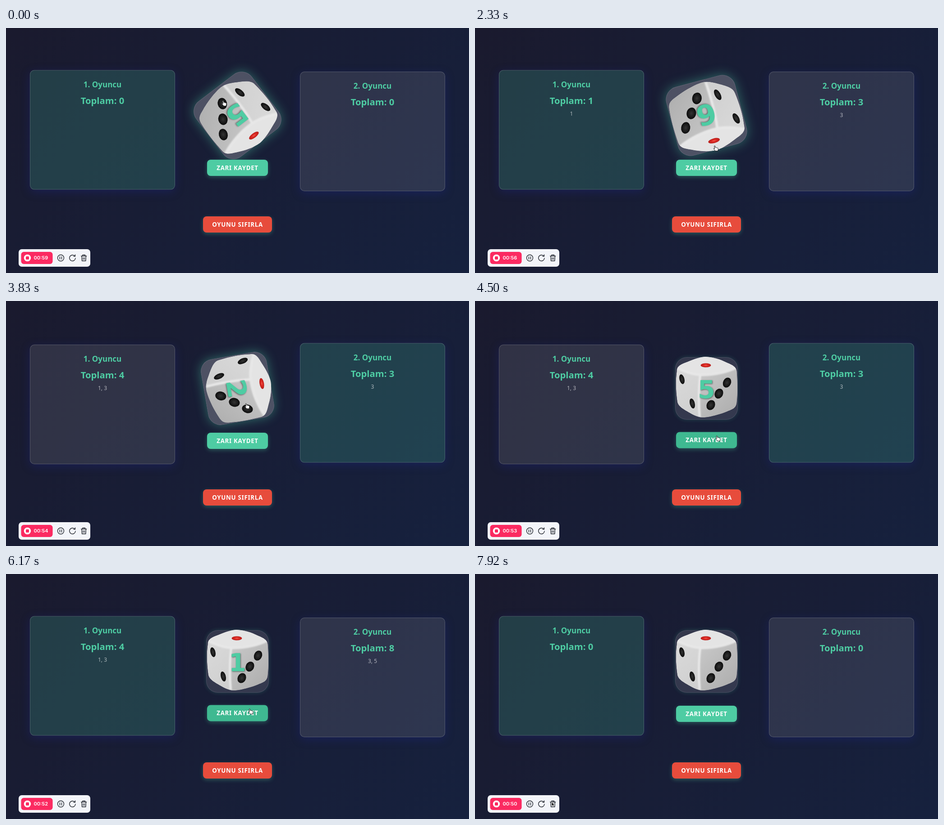
Write an HTML page that moves like this. It is 1027 by 545 pixels and loops after 8000 ms.

```html
<!DOCTYPE html>
<html lang="tr">
<head>
<meta charset="utf-8">
<title>Zar Oyunu</title>
<style>
  html, body { margin: 0; width: 100%; height: 100%; overflow: hidden; }
  body {
    position: relative;
    background: linear-gradient(135deg, #1a1a2e, #16213e);
    font-family: "Noto Sans", "Open Sans", sans-serif;
  }
  .card, .button, .die, .recorder, .cursor { position: absolute; box-sizing: border-box; }
  .card {
    top: 97px; width: 322px; height: 266px;
    border: 1px solid rgba(255, 255, 255, .18); border-radius: 10px;
    box-shadow: 0 5px 20px rgba(31, 38, 135, .37);
    color: #4ecca3; text-align: center; font-weight: 700;
  }
  .card div { position: absolute; width: 100%; line-height: 24px; }
  .name { top: 18.5px; font-size: 17px; }
  .total { top: 53.5px; font-size: 20.3px; }
  .card .list { top: 84px; font-size: 12px; font-weight: 400; color: rgba(255, 255, 255, .64); }
  .button {
    height: 36px; border-radius: 8px; line-height: 36px;
    box-shadow: 0 3px 10px rgba(78, 204, 163, .32);
    color: #fff; font-size: 13.3px; font-weight: 700; text-align: center;
    letter-spacing: .7px; white-space: nowrap;
  }
  .save { left: 446px; top: 292.5px; width: 135px; }
  .reset { left: 437px; top: 419px; width: 153px; }
  .die {
    left: 444px; top: 125px; width: 139px; height: 139px;
    border: 1px solid rgba(255, 255, 255, .1); border-radius: 26px;
  }
  .die svg { position: absolute; left: -1px; top: -1px; overflow: visible; }
  .number {
    position: absolute; inset: 0; text-align: center;
    font: 700 55px/143px "DejaVu Sans", sans-serif; color: #4ecca3;
    text-shadow: 1px 1px 3px rgba(0, 0, 0, .5);
  }
  .recorder {
    left: 28px; top: 492px; width: 159px; height: 39px;
    border-radius: 7px; background: #f3f5fa;
  }
  .recorder svg { position: absolute; left: 0; top: 0; }
  .clock {
    position: absolute; left: 33.5px; top: 6px; line-height: 27px;
    font-family: Inter, sans-serif; font-size: 11px; font-weight: 600; color: #fff;
  }
  .cursor { left: -8px; top: -8px; }
</style>
</head>
<body>
<div class="card" style="left:53px">
  <div class="name">1. Oyuncu</div><div class="total"></div><div class="list"></div>
</div>
<div class="card" style="left:652px">
  <div class="name">2. Oyuncu</div><div class="total"></div><div class="list"></div>
</div>

<div class="die">
  <svg width="139" height="139" viewBox="-69.5 -69.5 139 139">
    <defs>
      <linearGradient id="left" x1="0" y1="0" x2="1" y2="1">
        <stop stop-color="#dcdcdc"/><stop offset="1" stop-color="#c8c8c8"/>
      </linearGradient>
      <linearGradient id="right" x1="0" y1="0" x2=".7" y2="1">
        <stop stop-color="#cacaca"/><stop offset="1" stop-color="#afafaf"/>
      </linearGradient>
      <radialGradient id="pip">
        <stop stop-color="#353535"/><stop offset=".6" stop-color="#1c1c1c"/><stop offset="1" stop-color="#0c0c0c"/>
      </radialGradient>
      <radialGradient id="red">
        <stop stop-color="#f0564a"/><stop offset=".5" stop-color="#d9251f"/><stop offset="1" stop-color="#b5201c"/>
      </radialGradient>
      <filter id="soft"><feGaussianBlur stdDeviation="1.6"/></filter>
      <path id="body" d="M-66-38C-66-52-52-55-40-60C-28-65-14-70-2-70.5C14-70 30-65 46-57C58-52 66-48 67-38C69-10 69 10 67 30C66 44 58 46 46 51C32 57 10 63-2 64C-16 66-26 61-38 54C-50 47-64 40-65 28C-68 5-69-15-66-38Z"/>
      <clipPath id="shape"><use href="#body"/></clipPath>
    </defs>
    <g clip-path="url(#shape)">
      <use href="#body" fill="url(#left)"/>
      <path d="M-13-32C10-30 45-36 70-48V70H-17C-15 40-17 0-13-32Z" fill="url(#right)"/>
      <path d="M-70-50C-50-38-32-32-13-31C15-30 45-37 70-49V-80H-70Z" fill="#e4e4e4"/>
      <path d="M-66-46C-50-38-32-31-13-30C15-29 45-36 66-46M-14-28C-18 0-17 40-15 64"
        fill="none" stroke="#e8e8e8" stroke-width="5" filter="url(#soft)"/>
    </g>
    <g fill="url(#pip)">
      <ellipse rx="5.5" ry="11" transform="translate(-54.5 -20.5) rotate(-14)"/>
      <ellipse rx="5.5" ry="11.3" transform="translate(-31.5 33.5) rotate(-14)"/>
      <ellipse rx="8.8" ry="11.4" transform="translate(45.5 -13) rotate(24)"/>
      <ellipse rx="9.2" ry="11.4" transform="translate(27.5 11.5) rotate(24)"/>
      <ellipse rx="9.2" ry="11.4" transform="translate(9.5 37) rotate(24)"/>
    </g>
    <ellipse cx="-1.5" cy="-51.5" rx="11.5" ry="4.6" fill="url(#red)"/>
  </svg>
  <div class="number"></div>
</div>

<div class="button save">ZARI KAYDET</div>
<div class="button reset">OYUNU SIFIRLA</div>

<div class="recorder">
  <svg width="159" height="39" fill="none" stroke="#20242c" stroke-width="1.4" stroke-linecap="round" stroke-linejoin="round">
    <g stroke="none">
      <rect x="5.5" y="6" width="70" height="27" rx="6" fill="#fb2a61"/>
      <circle cx="19.5" cy="19.5" r="7.7" fill="#fff"/>
      <rect x="16" y="16" width="7" height="7" rx="1.5" fill="#fb2a61"/>
    </g>
    <circle cx="93.5" cy="19.5" r="7"/>
    <path d="M91.5 16.7v5.6M95.5 16.7v5.6"/>
    <path d="M124.6 15.5A6.6 6.6 0 1 0 126 20M125.4 12.3v3.6h-3.6"/>
    <path d="M138.7 15.3h12M142 15v-2.3h5.4V15M140 15.5l.6 10.5h8.2l.6-10.5M143.2 18.7v4.2M146.2 18.7v4.2"/>
  </svg>
  <div class="clock"></div>
</div>

<svg class="cursor" width="16" height="16" viewBox="-8 -8 16 16">
  <path class="hand" d="M-3.6-5.2C-3.6-6.6-1.8-6.6-1.6-5.2L-1-2.2C0-2.9 1-2.6 1.3-1.8C2.2-2.3 3-1.9 3.3-1.1C4.2-1.4 4.9-.9 5 .2C5.2 2.3 4.7 3.4 4.2 5.4H-1.2C-2 3.6-4.2 2-5 .5C-5.2-.5-4-.8-2.6.6Z"
    fill="#fff" stroke="#222" stroke-linejoin="round"/>
  <path class="arrow" d="M-3-5V4.2L-.9 2.3L.6 5.6L2.2 4.9L.8 1.7H3.6Z" fill="#111" stroke="#fff" stroke-width=".8"/>
</svg>

<script>
const LOOP = 8000, FPS = 12, ROLL = 500, RESET = 7250;

// Times in ms at which a player rolls and then saves the result.
const turns = [
  { roll: -198, save: 400, result: 1 },
  { roll: 440, save: 1500, result: 3 },
  { roll: 2104, save: 3330, result: 3 },
  { roll: 3722, save: 4750, result: 5 },
  { roll: 5560, save: 6420, result: 1 }
];

const freezes = [[0, 6], [15, 18], [23, 25], [34, 38], [42, 44], [54, 57], [74, 77]];

// The cursor goes from the die to the save button in every turn, then to reset and the bin.
const stops = [
  { at: 0, x: 484, y: 168 },
  ...turns.slice(1).flatMap(({ roll, save }, i) => {
    const onSave = { x: 531 + 4 * i, y: 306 };
    return [{ at: roll - 100, x: 533, y: 199 }, { at: roll + 450, ...onSave }, { at: save, ...onSave }];
  }),
  { at: RESET - 80, x: 514, y: 437 },
  { at: RESET, x: 514, y: 437 },
  { at: LOOP - 100, x: 173, y: 512 }
];

const $ = selector => document.querySelector(selector);
const cards = [...document.querySelectorAll(".card")];
const die = $(".die"), cursor = $(".cursor");

const clamp = x => Math.min(1, Math.max(0, x));
const ease = x => (x = clamp(x), x * x * (3 - 2 * x));
const mix = (a, b, p) => a + (b - a) * p;
const mixColor = (a, b, p) => `rgba(${a.map((v, i) => mix(v, b[i], p))})`;

function recordedTime(t) {
  const frame = Math.floor(t * FPS / 1000 + .1);
  const freeze = freezes.find(([from, to]) => frame >= from && frame < to);
  return (freeze ? freeze[0] : frame) * 1000 / FPS;
}

function cursorAt(t) {
  const next = stops.findIndex(stop => stop.at > t);
  if (next < 0) return stops[stops.length - 1];
  const a = stops[next - 1], b = stops[next];
  const p = ease((t - a.at) / (b.at - a.at));
  return { x: mix(a.x, b.x, p), y: mix(a.y, b.y, p) };
}

// Hover grows with the cursor's distance from the nearest edge.
function hoverOver(element, { x, y }) {
  const { offsetLeft, offsetTop, offsetWidth: w, offsetHeight: h } = element;
  const dx = w / 2 - Math.abs(x - offsetLeft - w / 2);
  const dy = h / 2 - Math.abs(y - offsetTop - h / 2);
  return clamp(Math.min(dx, dy) / 16);
}

function drawCards(t) {
  const saved = t < RESET ? turns.filter(turn => turn.save <= t) : [];
  const changed = t < RESET ? (saved.length ? saved[saved.length - 1].save : -LOOP) : RESET;
  const p = ease((t - changed) / 300);
  cards.forEach((card, player) => {
    const active = player === saved.length % 2 ? p : 1 - p;
    const scores = saved.filter((_, i) => i % 2 === player).map(turn => turn.result);
    card.style.transform = `translateY(${-3.4 * active}px)`;
    card.style.background = mixColor([255, 255, 255, .1], [78, 204, 163, .2], active);
    card.querySelector(".total").textContent = "Toplam: " + scores.reduce((a, b) => a + b, 0);
    card.querySelector(".list").textContent = scores.join(", ");
  });
}

function drawDie(t, point) {
  const index = turns.filter(turn => turn.roll <= t).length - 1;
  const { roll, save, result } = turns[index];
  const p = (t - roll) / ROLL;
  const rolling = p < 1;
  const hover = hoverOver(die, point);
  const angle = rolling ? 360 * p : 5 * hover;
  const scale = rolling ? 1 + .15 * (1 - Math.abs(2 * p - 1)) : 1 + .05 * hover;
  const glow = rolling ? clamp((1 - p) / .4) : hover;
  const step = Math.floor((t - roll) / 100);
  const digit = step < 4 ? 1 + (index + 5 * step + 5) % 6 : result;
  die.style.transform = `rotate(${angle}deg) scale(${scale})`;
  die.style.background = `rgba(255,255,255,${mix(.12, .23, glow)})`;
  die.style.boxShadow = `0 0 ${mix(10, 22, glow)}px rgba(78,204,163,${mix(.22, .45, glow)})`;
  $(".number").textContent = t < save ? digit : "";
}

function drawButton(button, point, rest, dark) {
  const hover = hoverOver(button, point);
  button.style.transform = `translateY(${-2 * hover}px)`;
  button.style.background = mixColor(rest, dark, hover);
}

function drawCursor(t, { x, y }) {
  const arrow = t > RESET + 150;
  cursor.style.transform = `translate(${x}px, ${y}px)`;
  $(".hand").style.display = arrow ? "none" : "";
  $(".arrow").style.display = arrow ? "" : "none";
}

function draw() {
  const t = recordedTime(performance.now() % LOOP);
  const point = cursorAt(t);
  drawCards(t);
  drawDie(t, point);
  drawButton($(".save"), point, [78, 204, 163, 1], [60, 180, 141, 1]);
  drawButton($(".reset"), point, [231, 76, 60, 1], [205, 62, 48, 1]);
  drawCursor(t, point);
  $(".clock").textContent = "00:" + (t ? 57 - Math.floor((t - 480) / 1000) : 59);
  requestAnimationFrame(draw);
}
draw();
</script>
</body>
</html>
```
